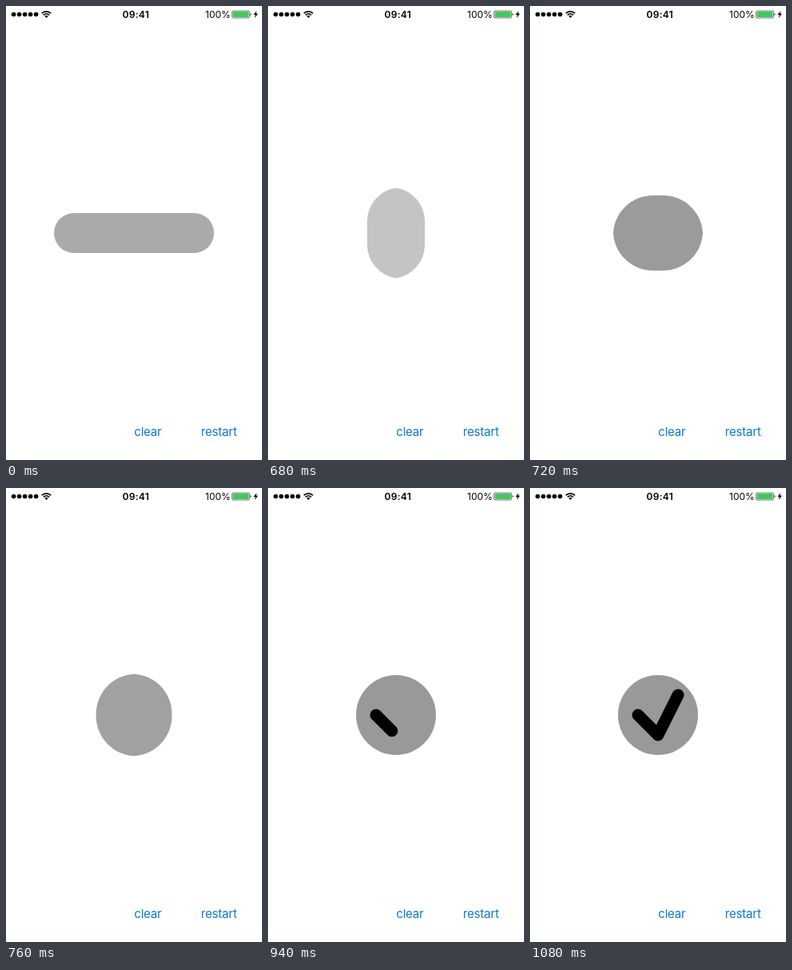
Recreate the animation shown at these times as an HTML page. Size 320x568 px, loop 2 s.

```html
<!DOCTYPE html>
<html lang="en">
<head>
<meta charset="utf-8">
<title>Button to check mark</title>
<style>
  html, body { margin: 0; width: 100%; height: 100%; overflow: hidden; background: #fff; }
  svg { display: block; width: 320px; height: 568px; }
  text { font-family: Inter, Roboto, sans-serif; font-size: 12px; }
  .action { font-size: 15px; letter-spacing: -.2px; fill: #0a78d8; }
</style>
</head>
<body>
<svg viewBox="0 0 320 568">
  <g id="signal"></g>
  <g fill="none" stroke="#000" stroke-width="1.7">
    <path d="M44.8 9.2A8.2 8.2 0 0 1 56.2 9.2"/>
    <path d="M46.9 11.4A5.2 5.2 0 0 1 54.1 11.4"/>
  </g>
  <path d="M48.4 12.8A3 3 0 0 1 52.6 12.8L50.5 15Z"/>
  <text x="145.5" y="15" font-weight="600" letter-spacing=".3">09:41</text>
  <text x="249" y="15">100%</text>
  <rect x="282.5" y="6" width="22" height="9" rx="1.5" fill="#fff" stroke="#555" stroke-width=".8"/>
  <rect x="283.5" y="7" width="20" height="7" rx=".6" fill="#43c75e"/>
  <path d="M305.5 9A1.6 1.6 0 0 1 305.5 12Z" fill="#333"/>
  <path d="M313.4 6L309.4 11.1H311.9L310.8 15L315 9.6H312.4Z"/>

  <path id="shape" transform="translate(160 284)"/>
  <path id="check" d="M135 284L160 309L185 259" pathLength="1" fill="none" stroke="#000"
    stroke-width="15" stroke-linecap="round" stroke-linejoin="round"/>

  <text class="action" x="160.3" y="538">clear</text>
  <text class="action" x="243.8" y="538">restart</text>
</svg>
<script>
const LOOP = 2000, STEP = 20, START = 640, LAST = 22;
const shape = document.getElementById('shape');
const check = document.getElementById('check');
const clamp = v => Math.min(1, Math.max(0, v));

document.getElementById('signal').innerHTML = Array.from({ length: 5 },
  (_, i) => `<circle cx="${9.6 + 7 * i}" cy="10.5" r="2.8"/>`).join('');

// Damped oscillation around 1, with its first peak at step 2.
function spring(n) {
  const u = n - 2, angle = 1.522 * u;
  return 1 + 0.28 * 0.669 ** u * (Math.cos(angle) + 0.26 * Math.sin(angle));
}

// Corner arcs larger than half a side are cut off at the middle of that side.
function roundedRect(w, h, r) {
  const x = w / 2, y = h / 2;
  const a = Math.min(r, x), b = Math.min(r, y);
  const inset = reach => r - Math.sqrt(r * r - (r - reach) ** 2);
  const sx = x - inset(b), sy = y - b, tx = x - a, ty = y - inset(a);
  const arc = (px, py) => `A${r} ${r} 0 0 1 ${px} ${py}`;
  return `M${-sx} ${-sy}${arc(-tx, -ty)}L${tx} ${-ty}${arc(sx, -sy)}` +
    `L${sx} ${sy}${arc(tx, ty)}L${-tx} ${ty}${arc(-sx, sy)}Z`;
}

function draw(time) {
  const n = Math.min(LAST, Math.floor((time - START) / STEP));
  const p = n < 1 ? 0 : n === LAST ? 1 : spring(n);
  const rounding = 1 - (1 - clamp(n / 4.5)) ** 2;
  shape.setAttribute('d', roundedRect(200 - 100 * p, 50 + 50 * p, 25 + 25 * rounding));

  const gray = Math.round(170 * Math.max(0, 1 - p) + 153 * p);
  shape.setAttribute('fill', `rgb(${gray},${gray},${gray})`);

  const drawn = clamp((n - 11.9) / 10.1);
  check.setAttribute('visibility', drawn > 0 ? 'visible' : 'hidden');
  check.setAttribute('stroke-dasharray', drawn < 1 ? `${drawn} 2` : 'none');
}

const origin = performance.now();
function tick() {
  draw((performance.now() - origin) % LOOP);
  requestAnimationFrame(tick);
}
tick();
</script>
</body>
</html>
```
